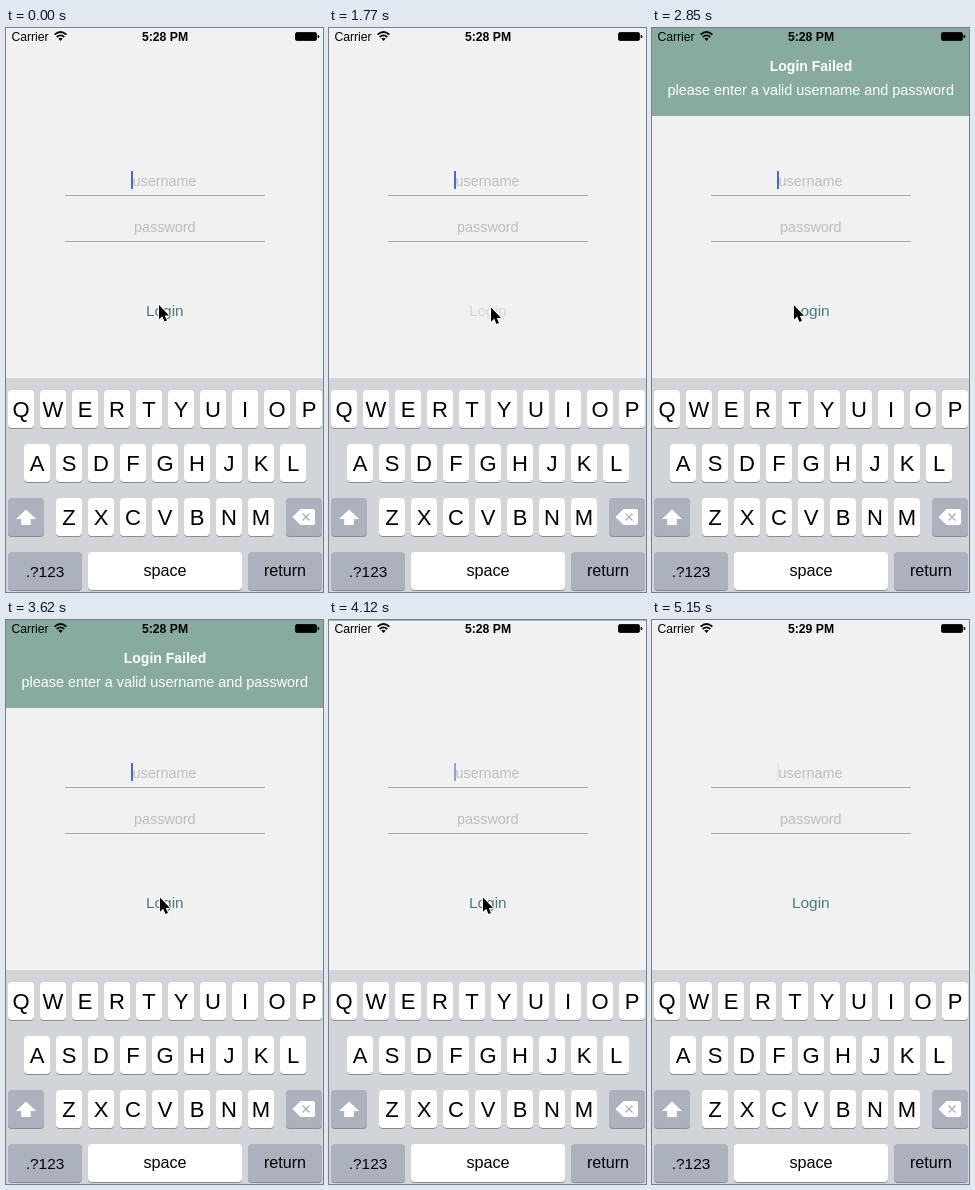
Animation, 317 px wide and 564 px high, one loop 5330 ms. Source, as an HTML page:

```html
<!DOCTYPE html>
<html lang="en">
<head>
<meta charset="utf-8">
<title>Login</title>
<style>
  html, body { margin: 0; width: 100%; height: 100%; overflow: hidden; background: #f1f1f1; }
  svg { display: block; width: 317px; height: 564px; }
  text { font-family: "Liberation Sans", Arial, sans-serif; text-anchor: middle; }
  .bold { font-weight: bold; }
  .hint { font-size: 14.4px; fill: #bdbdbf; }
  .cap { font-size: 22px; }
</style>
</head>
<body>
<svg viewBox="0 0 317 564">
  <rect width="317" height="564" fill="#f1f1f1"/>

  <g id="form">
    <text class="hint" x="158.5" y="158">username</text>
    <text class="hint" x="158.8" y="204">password</text>
    <path d="M59 167.5H259M59 213.5H259" stroke="#a9a9aa"/>
    <rect id="caret" x="125" y="143" width="2" height="18" fill="#426bd4"/>
    <text id="login" x="158.8" y="288" font-size="15.4" fill="#4a7c7e">Login</text>
  </g>

  <g id="banner">
    <rect width="317" height="88" fill="#87ac9f"/>
    <text class="bold" x="159" y="43" font-size="14" fill="#fff">Login Failed</text>
    <text x="158.7" y="67" font-size="14.4" fill="#fff">please enter a valid username and password</text>
  </g>

  <g id="status">
    <text x="24" y="13" font-size="12.2">Carrier</text>
    <g fill="none" stroke="#000" stroke-width="1.7">
      <path d="M48.6 6.6Q54.5 1.4 60.4 6.6M50.7 9Q54.5 5.6 58.3 9"/>
    </g>
    <path d="M52.3 10.6Q54.5 8.7 56.7 10.6L54.5 13Z"/>
    <text id="clock" class="bold" x="159" y="13" font-size="12.2">5:28 PM</text>
    <rect x="289.5" y="4.5" width="21" height="8" rx="1.5" stroke="#000" stroke-width=".8"/>
    <path d="M311.6 6.8Q313.4 7 313.4 8.5T311.6 10.2Z"/>
  </g>

  <rect y="350" width="317" height="214" fill="#d1d5da"/>
  <g id="keys"></g>
  <path d="M20 481.5L30 491H24.8V497H15.2V491H10Z" fill="#fff"/>
  <path d="M286.5 489L293.5 482Q294.3 481 295.5 481H307Q309 481 309 483V495Q309 497 307 497H295.5Q294.3 497 293.5 496Z" fill="#fff"/>
  <path d="M296.5 485.5L303.5 492.5M303.5 485.5L296.5 492.5" stroke="#a3abb7" stroke-width="1.2"/>

  <path id="pointer" d="M0 0V14.2L3.2 11.3L5.5 16.6L8 15.5L5.7 10.4H10Z" stroke="#fff" stroke-width="1.6" paint-order="stroke" stroke-linejoin="round"/>
</svg>
<script>
const LOOP = 5330;
const $ = id => document.getElementById(id);
const clamp = p => Math.min(1, Math.max(0, p));
const ramp = (t, from, to) => clamp((t - from) / (to - from));
const ease = p => p * p * (3 - 2 * p);

function key(x, y, w, label = '', o = {}) {
  const { fill = '#fff', size = 22, base = 27 } = o;
  return `<rect x="${x}" y="${y + 1}" width="${w}" height="38" rx="4" fill="#898c91"/>
    <rect x="${x}" y="${y}" width="${w}" height="38" rx="4" fill="${fill}"/>
    <text x="${x + w / 2}" y="${y + base}" font-size="${size}">${label}</text>`;
}

const row = (letters, x, y) => [...letters].map((c, i) => key(x + 32 * i, y, 26, c)).join('');
const gray = '#abb2be';

$('keys').innerHTML =
  row('QWERTYUIOP', 2, 362) + row('ASDFGHJKL', 18, 416) + row('ZXCVBNM', 50, 470) +
  key(2, 470, 36, '', { fill: gray }) + key(280, 470, 36, '', { fill: gray }) +
  key(2, 524, 74, '.?123', { fill: gray, size: 15.4, base: 25 }) +
  key(82, 524, 154, 'space', { size: 16.2, base: 24 }) +
  key(242, 524, 74, 'return', { fill: gray, size: 16.1, base: 24 });

// Caret fades: [time, visible afterwards]
const blinks = [
  [230, 0], [640, 1], [1150, 0], [1660, 1], [2150, 0], [2600, 1],
  [3090, 0], [3500, 1], [4070, 0], [4490, 1], [5040, 0]
];

// Pointer moves: [start, end, x, y]
const moves = [
  [40, 70, 153.3, 277.3], [230, 460, 153.7, 279], [640, 750, 154, 280.5],
  [1140, 1520, 162, 279.5], [2550, 2850, 142, 277.3], [3090, 3620, 154, 277.5],
  [4200, 4450, -14, 284]
];

function caretAlpha(t) {
  let alpha = 1;
  for (const [start, on] of blinks) {
    alpha += (on - alpha) * ramp(t, start, start + (on ? 105 : 120));
  }
  return alpha;
}

function pointerAt(t) {
  let x = 153, y = 277;
  for (const [start, end, tx, ty] of moves) {
    const p = ease(ramp(t, start, end));
    x += (tx - x) * p;
    y += (ty - y) * p;
  }
  return [x, y];
}

function draw(t) {
  $('caret').setAttribute('opacity', caretAlpha(t));
  $('login').setAttribute('opacity', t < 1690 ? 1 : 0.2 + 0.8 * ramp(t, 1920, 2150));

  const shown = ease(ramp(t, 1950, 2270)) - ease(ramp(t, 3950, 4130));
  $('banner').setAttribute('transform', `translate(0 ${-88 * (1 - shown)})`);

  $('clock').textContent = t < 4450 ? '5:28 PM' : '5:29 PM';
  $('pointer').setAttribute('transform', `translate(${pointerAt(t)})`);
}

let origin;
function tick(now) {
  origin ??= now;
  draw((now - origin) % LOOP);
  requestAnimationFrame(tick);
}
draw(0);
requestAnimationFrame(tick);
</script>
</body>
</html>
```
